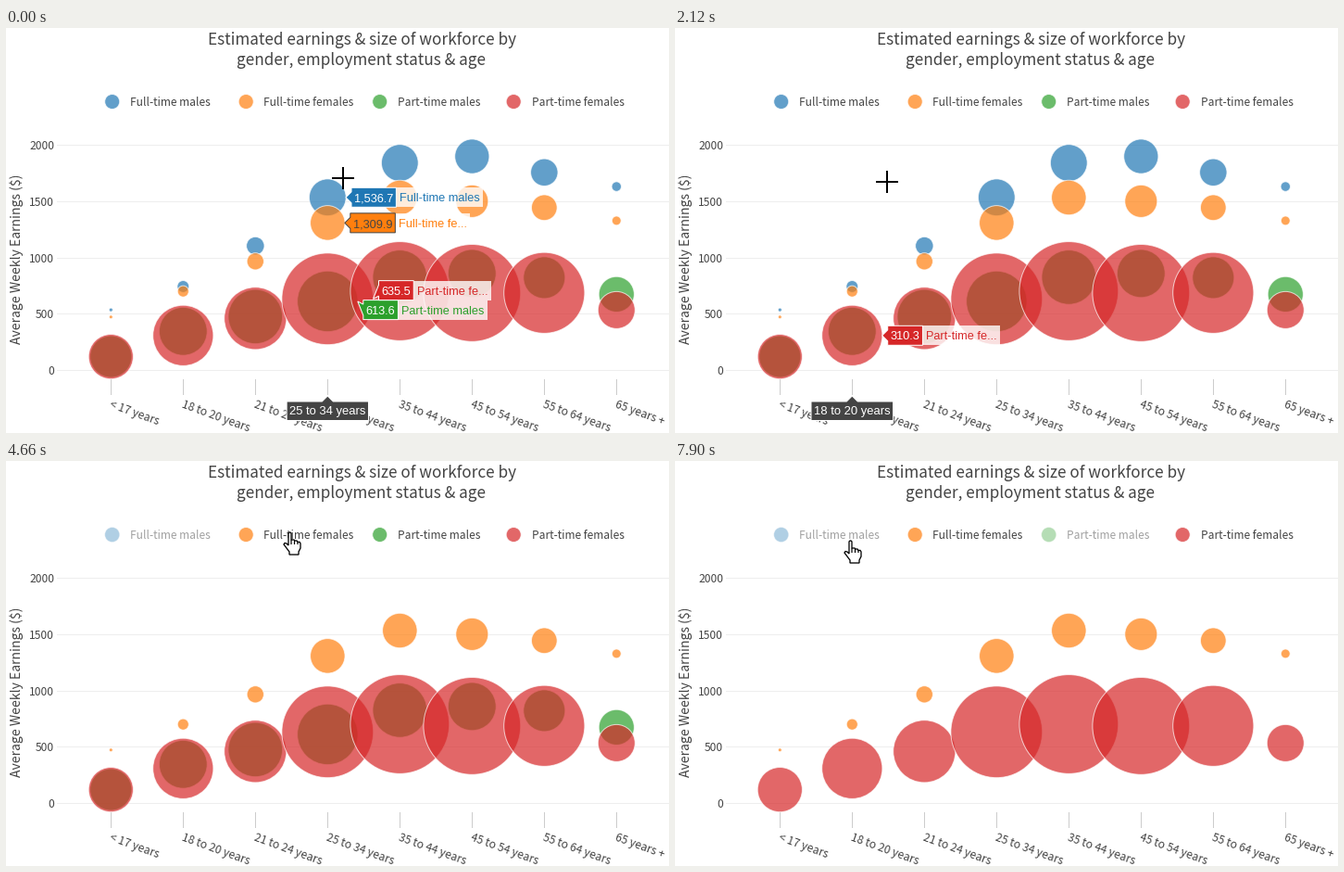
These frames come from a looping animation (716x437 px, 8000 ms). A matplotlib script:

```python
import matplotlib.pyplot as plt
import numpy as np
from matplotlib.animation import FuncAnimation
from matplotlib.patches import Circle, Polygon, Rectangle

W, H, DPI = 716, 437, 100
LOOP, STEP = 8000, 40
PX = 72 / DPI
BODY, HOVER = "Noto Sans CJK JP", "Liberation Sans"
DARK = "#444444"

AGES = ["< 17 years", "18 to 20 years", "21 to 24 years", "25 to 34 years",
        "35 to 44 years", "45 to 54 years", "55 to 64 years", "65 years +"]
GROUP = np.arange(len(AGES))
COLS = 113.0 + 78 * GROUP

# bubble radii in pixels; two follow from simple rules
FULL_M = np.array([1.6, 6, 9.3, 19.5, 19.5, 18.2, 14.3, 4.8])
FULL_F = 0.94 * FULL_M
PART_M = 32.3 - 3.4 * np.abs(GROUP - 3)
PART_F = np.array([23.7, 32.2, 33.2, 49, 53, 52, 43.2, 19.6])

# name, colour, weekly earnings, radii
TRACES = [
    ("Full-time males", "#1f77b4",
     [538, 745.4, 1106.4, 1536.7, 1843, 1901, 1759, 1633], FULL_M),
    ("Full-time females", "#ff7f0e",
     [475, 702.3, 968.5, 1309.9, 1535, 1503, 1446, 1330], FULL_F),
    ("Part-time males", "#2ca02c",
     [123.2, 347.6, 478.3, 613.6, 828, 861, 824, 676], PART_M),
    ("Part-time females", "#d62728",
     [122.4, 310.3, 462.4, 635.5, 704, 688, 689, 536], PART_F),
]

# cursor moves: start, end, x, y; it rests in between
START = (364, 162)
MOVES = [
    (560, 1160, 286, 159), (1470, 2270, 217.5, 167), (2270, 2290, 181, 166),
    (2910, 3380, 147, 148), (3380, 3700, 120, 104), (3730, 4030, 105, 77),
    (4520, 4660, 305, 77), (5500, 5760, 437, 77), (6560, 6880, 320, 82),
    (7510, 7900, 188, 86),
]
LEAVE_PLOT = 3730
CLICKS = [(4520, 0), (5500, 1), (6560, 2), (7510, 1)]  # time, toggled trace


def y_of(value):
    return 369.5 - 0.1215 * value


fig = plt.figure(figsize=(W / DPI, H / DPI), dpi=DPI, facecolor="white")
ax = fig.add_axes([0, 0, 1, 1])
ax.set_xlim(0, W)
ax.set_ylim(H, 0)
ax.axis("off")


def put_text(x, y, s, size, font=BODY, color=DARK, **kw):
    kw.setdefault("va", "baseline")
    return ax.text(x, y, s, fontsize=size * PX, family=font, color=color, **kw)


def put_line(xs, ys, color, width, z):
    return ax.plot(xs, ys, color=color, lw=width * PX, zorder=z,
                   solid_capstyle="butt", snap=False)[0]


def put_bubble(x, y, r, color, z):
    return ax.add_patch(Circle((x, y), r, fc=color, ec="white", lw=PX,
                               alpha=.7, zorder=z))


def text_width(s, size):
    probe = put_text(0, 0, s, size, HOVER)
    width = probe.get_window_extent().width
    probe.remove()
    return width


# title, axes, grid
put_text(384, 18.5, "Estimated earnings & size of workforce by", 17.15, ha="center")
put_text(383.7, 40.3, "gender, employment status & age", 17.15, ha="center")
put_text(4, 249, "Average Weekly Earnings ($)", 14, rotation=90,
         ha="left", va="center")
for value in range(0, 2001, 500):
    y = np.floor(y_of(value)) + .5
    put_line([55, W], [y, y], "#eeeeee", 1, 1)
    put_text(52.3, y + 4.5, str(value), 12.1, ha="right")
for x, age in zip(COLS, AGES):
    put_line([x + .5, x + .5], [379, 396], "#cccccc", 1, 1)
    put_text(x - 2, 409.5, age, 12.1, rotation=-20, rotation_mode="anchor",
             ha="left", zorder=1)

# legend and bubbles
legend, bubbles = [], []
for k, (name, color, values, radii) in enumerate(TRACES):
    x = 114.7 + 144.5 * k
    legend.append((put_bubble(x, 79.5, 8, color, 1),
                   put_text(x + 19.3, 84, name, 12)))
    bubbles.append([put_bubble(cx + .3, y_of(v), r + .4, color, 2 + k)
                    for cx, v, r in zip(COLS, values, radii)])


class Tag:
    """Value box with a pointer, followed by the trace name."""
    SIZE, HALF = 12.75, 10.5

    def __init__(self, name, color):
        short = name if len(name) <= 15 else name[:12] + "..."
        ink = DARK if color == "#ff7f0e" else "white"
        self.name_w = text_width(short, self.SIZE) + 7
        self.back = ax.add_patch(Rectangle((0, 0), 1, 1, fc="white", alpha=.8, lw=0, zorder=10))
        self.box = ax.add_patch(Polygon([(0, 0)] * 3, fc=color, ec=ink, lw=PX, zorder=11))
        self.value = put_text(0, 0, "", self.SIZE, HOVER, ink, zorder=12)
        self.name = put_text(0, 0, short, self.SIZE, HOVER, color, zorder=12)
        self.parts = [self.back, self.box, self.value, self.name]

    def hide(self):
        for part in self.parts:
            part.set_visible(False)

    def show(self, x, y, mid, label, width):
        for part in self.parts:
            part.set_visible(True)
        left, right, h = x + 6, x + 6 + width, self.HALF
        self.box.set_xy([(x, y), (left, mid + 6), (left, mid + h), (right, mid + h),
                         (right, mid - h), (left, mid - h), (left, mid - 6)])
        self.back.set_bounds(right, mid - h, self.name_w, 2 * h)
        self.value.set_text(label)
        self.value.set_position((left + 3, mid + 4.7))
        self.name.set_position((right + 4, mid + 4.7))


tags = [Tag(name, color) for name, color, _, _ in TRACES]
age_box = ax.add_patch(Polygon([(0, 0)] * 3, fc=DARK, ec="white", lw=PX, zorder=13))
age_text = put_text(0, 417.3, "", 13, HOVER, "white", ha="center", zorder=14)
labels = [f"{v:,.1f}" for trace in TRACES for v in trace[2]]
label_w = {s: text_width(s, Tag.SIZE) + 6 for s in labels}
age_w = {age: text_width(age, 13) + 6 for age in AGES}

# cursors
cross = [put_line([0, 0], [0, 0], "black", 2, 20) for _ in range(2)]
HAND = np.array([
    (0, 1), (1, 0), (2, 0), (3, 1), (3, 8), (6, 8), (7, 9), (9, 9), (10, 10.4),
    (12, 10.4), (13, 12), (13, 17), (11, 21), (11, 24), (1, 24), (1, 21),
    (-5, 13), (-4, 11.5), (-2, 12), (0, 14)])
hand = ax.add_patch(Polygon(HAND, fc="white", ec="black", lw=1.3 * PX, zorder=20))
knuckles = [put_line([0, 0], [0, 0], "black", 1.2, 21) for _ in range(3)]


def pick(x):
    """Column nearest to the cursor and the traces within reach there."""
    best = []
    for k, (_, _, _, radii) in enumerate(TRACES):
        r = np.maximum(3, radii)
        dist = np.maximum(np.abs(COLS - x) - r, 1 - 3 / r)
        col = int(np.argmin(dist))
        best.append((dist[col], col, k))
    column = min(best)[1]
    return column, [k for d, c, k in best if c == column and d < 20]


def spread(ys, gap=2 * Tag.HALF):
    """Push neighbouring labels apart until they no longer overlap."""
    order, mids = np.argsort(ys, kind="stable"), np.array(ys, float)
    for a, b in zip(order, order[1:]):
        push = max(0, gap - (mids[b] - mids[a])) / 2
        mids[a] -= push
        mids[b] += push
    return mids


def cursor_at(t):
    x, y = START
    for begin, end, to_x, to_y in MOVES:
        p = np.clip((t - begin) / (end - begin), 0, 1)
        x, y = x + (to_x - x) * p, y + (to_y - y) * p
    return x, y


def draw_hover(x, on):
    for tag in tags:
        tag.hide()
    age_box.set_visible(on)
    age_text.set_visible(on)
    if not on:
        return
    col, shown = pick(x)
    ys = [y_of(TRACES[k][2][col]) for k in shown]
    for k, y, mid in zip(shown, ys, spread(ys)):
        _, _, values, radii = TRACES[k]
        label = f"{values[col]:,.1f}"
        tags[k].show(COLS[col] + radii[col] + .5, y, mid, label, label_w[label])
    cx, half = COLS[col] + .3, age_w[AGES[col]] / 2
    age_box.set_xy([(cx, 397), (cx + 6, 403), (cx + half, 403), (cx + half, 423.5),
                    (cx - half, 423.5), (cx - half, 403), (cx - 6, 403)])
    age_text.set_text(AGES[col])
    age_text.set_x(cx)


def draw_cursor(x, y, in_plot):
    for part in cross:
        part.set_visible(in_plot)
    for part in [hand, *knuckles]:
        part.set_visible(not in_plot)
    cross[0].set_data([x - 12, x + 12], [y, y])
    cross[1].set_data([x, x], [y - 12, y + 12])
    hand.set_xy(HAND + (x, y))
    for n, line in enumerate(knuckles):
        kx = x + 3 + 3.5 * n
        line.set_data([kx, kx], [y + 8 + n, y + 13])


def update(i):
    t = i * STEP + STEP / 2
    x, y = cursor_at(t)
    in_plot = t < LEAVE_PLOT
    for k, ((dot, text), group) in enumerate(zip(legend, bubbles)):
        visible = sum(t >= when and k == hit for when, hit in CLICKS) % 2 == 0
        dot.set_alpha(.7 if visible else .35)
        text.set_alpha(1 if visible else .5)
        for bubble in group:
            bubble.set_visible(visible)
    draw_hover(x, in_plot)
    draw_cursor(round(x), round(y), in_plot)
    return []


anim = FuncAnimation(fig, update, frames=LOOP // STEP, interval=STEP,
                     repeat=True, repeat_delay=0, blit=False)
plt.show()
```
